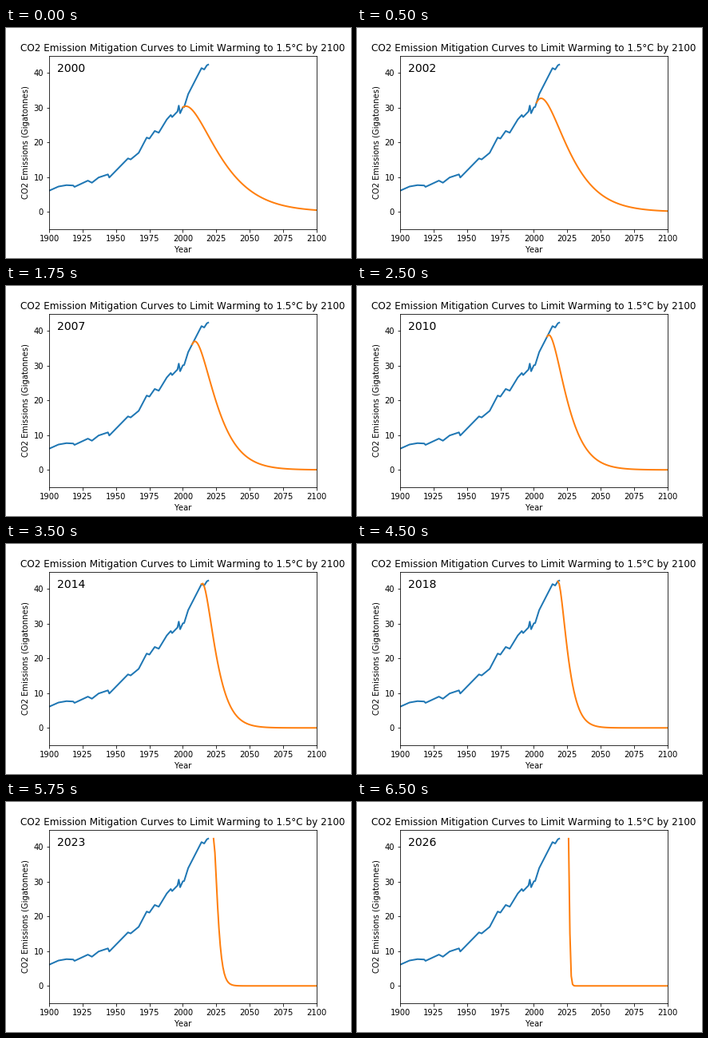
Recreate the animation shown at these times as a matplotlib script. Size 432 px wide and 288 px high, loop 6750 ms.

```python
import numpy as np
import matplotlib.pyplot as plt
from matplotlib.animation import FuncAnimation

BUDGET = 420          # Gt CO2 left after BUDGET_YEAR
BUDGET_YEAR = 2017
GROWTH_SPAN = 4       # years used for the recent growth rate
FIRST_YEAR, LAST_YEAR = 1900, 2019
FIRST_START, LAST_START = 2000, 2026

# Turning points of the emission history: (year, Gt CO2)
TURNING_POINTS = [
    (1900, 6.1), (1907, 7.3), (1913, 7.7), (1918, 7.6), (1919, 7.2),
    (1929, 9.0), (1932, 8.4), (1937, 9.9), (1944, 10.8), (1945, 9.9),
    (1959, 15.4), (1961, 15.1), (1967, 17.0), (1973, 21.4), (1975, 21.1),
    (1979, 23.3), (1982, 22.8), (1988, 26.6), (1991, 27.9), (1992, 27.3),
    (1996, 28.9), (1997, 30.6), (1998, 28.4), (2000, 30.1), (2001, 30.2),
    (2004, 33.9), (2014, 41.4), (2016, 41.0), (2018, 42.2), (2019, 42.4),
]

# np.interp holds the last known level until mitigation starts
years = np.arange(FIRST_YEAR, LAST_START + 1)
emissions = np.interp(years, *zip(*TURNING_POINTS))
cumulative = np.cumsum(emissions)


def mitigation_curve(start):
    """Emissions E0 (1 + (r + m) t) exp(-m t) that use up the budget."""
    i = start - FIRST_YEAR
    e0 = emissions[i]
    r = (e0 / emissions[i - GROWTH_SPAN]) ** (1 / GROWTH_SPAN) - 1
    quota = BUDGET + cumulative[BUDGET_YEAR - FIRST_YEAR] - cumulative[i]
    lifetime = quota / e0
    m = (1 + np.sqrt(1 + r * lifetime)) / lifetime
    t = np.arange(2101 - start)
    return start + t, e0 * (1 + (r + m) * t) * np.exp(-m * t)


plt.rcParams.update({"font.family": "DejaVu Sans", "text.kerning_factor": 6})
fig, ax = plt.subplots(figsize=(6, 4), dpi=72)
fig.subplots_adjust(left=0.125, right=0.9, bottom=0.125, top=0.88)
ax.set(xlim=(1900, 2100), ylim=(-5, 45),
       xticks=range(1900, 2101, 25), yticks=range(0, 41, 10),
       xlabel="Year", ylabel="CO2 Emissions (Gigatonnes)",
       title="CO2 Emission Mitigation Curves to Limit Warming to 1.5°C by 2100")
known = years <= LAST_YEAR
ax.plot(years[known], emissions[known], color="C0", lw=2)
curve, = ax.plot([], [], color="C1", lw=2)
label = ax.text(0.03, 0.905, "", fontsize=14, transform=ax.transAxes)


def update(frame):
    start = FIRST_START + frame
    curve.set_data(*mitigation_curve(start))
    label.set_text(str(start))
    return curve, label


anim = FuncAnimation(fig, update, frames=LAST_START - FIRST_START + 1,
                     interval=250, repeat=True, repeat_delay=0)
plt.show()
```
